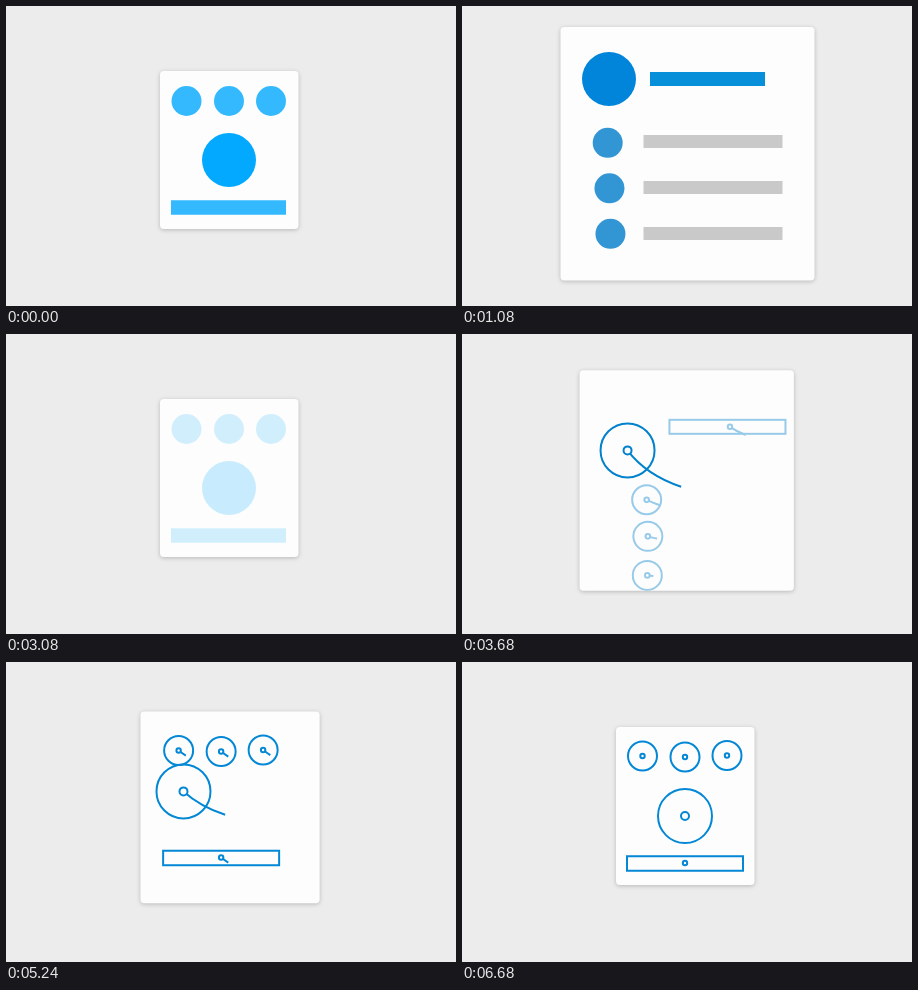
An HTML page that plays this animation: 450x300 px, repeating every 7080 ms.

```html
<!DOCTYPE html>
<html lang="en">
<head>
<meta charset="utf-8">
<title>Card transition</title>
<style>
  html, body { margin: 0; width: 100%; height: 100%; overflow: hidden; background: #ececec; }
  svg { display: block; width: 100vw; height: 100vh; }
  #card { fill: #fdfdfd; filter: drop-shadow(0 1px 2px rgba(0, 0, 0, .22)); }
</style>
</head>
<body>
<svg viewBox="0 0 450 300">
  <defs><clipPath id="inside"><rect id="clip" rx="4"/></clipPath></defs>
  <rect id="card" rx="4"/>
  <g id="content" clip-path="url(#inside)"></g>
</svg>
<script>
const LOOP = 7080;
const LINES_FROM = 3130;
const MOVE = 700;
const CARD_SMALL = [154, 65, 292.5, 223];
const CARD_LARGE = [98.5, 21, 352.5, 274.5];
const GRAY_BAR_TOPS = [129, 175, 221];

// Each path runs from the open pose (0) to the closed pose (1).
const FILLED = {
  open: 230, close: 1681, drift: [-28, -25],
  bright: [2, 169, 255], dark: [0, 133, 219],
  hero: [[147, 73], [173, 130], [223, 154]],
  row: [[180.5, 95], [223, 95], [265, 95]]
};
const LINED = {
  open: 3257, close: 4821, drift: [-21, -18],
  bright: [4, 136, 214], dark: [0, 121, 194],
  hero: [[147, 72], [158, 134], [223, 154]],
  row: [[180.5, 94], [223, 95], [265, 93.5]]
};
const LIST = [
  [[145, 136], [165, 160], [200, 172]],
  [[146, 181], [166, 199], [197, 205]],
  [[146, 226], [166, 241], [193, 242]]
];
const TITLE = [[248, 73], [262, 93], [285, 101.5]];

const $ = id => document.getElementById(id);
const ramp = (t, from, to) => Math.min(1, Math.max(0, (t - from) / (to - from)));
const ease = u => u * u * (3 - 2 * u);
const mix = (a, b, k) => a + (b - a) * k;
const mixAll = (a, b, k) => a.map((v, i) => mix(v, b[i], k));
const rgb = c => `rgb(${c.map(Math.round)})`;

// Quadratic blossom: a point when a equals b, a sub-curve's control otherwise.
const blossom = (path, a, b) =>
  mixAll(mixAll(path[0], path[1], a), mixAll(path[1], path[2], a), b);

const group = (opacity, body) => opacity > 0 ? `<g opacity="${opacity}">${body}</g>` : '';
const circle = ([x, y], r) => `<circle cx="${x}" cy="${y}" r="${r}"/>`;
const bar = ([x, y], w, h) => `<rect x="${x - w / 2}" y="${y - h / 2}" width="${w}" height="${h}"/>`;

function trail(path, s, dotRadius) {
  const end = 0.97;
  const at = blossom(path, s, s);
  const curve = s < end
    ? `<path d="M${at} Q${blossom(path, s, end)} ${blossom(path, end, end)}"/>` : '';
  return curve + `<g fill="#fdfdfd">${circle(at, dotRadius)}</g>`;
}

function driftPath([x, y], [dx, dy]) {
  return [[x + dx, y + dy], [x + dx * 0.55, y + dy * 0.4], [x, y]];
}

function draw(t) {
  const lined = t >= LINES_FROM;
  const look = lined ? LINED : FILLED;
  const closedness = (openDelay = 0, closeDelay = 0) => {
    const opened = ease(ramp(t - look.open - openDelay, 0, MOVE));
    const closed = ease(ramp(t - look.close - closeDelay, 0, MOVE));
    return 1 - opened + closed;
  };

  const s = closedness();
  const [left, top, right, bottom] = mixAll(CARD_LARGE, CARD_SMALL, s);
  for (const id of ['card', 'clip']) {
    const box = { x: left, y: top, width: right - left, height: bottom - top };
    for (const key in box) $(id).setAttribute(key, box[key]);
  }

  const shown = lined ? ramp(t, 3130, 3250) : 1 - ramp(t, 2900, 3130);
  let rowShown, listShown;
  if (lined) {
    rowShown = t < 4500 ? shown * (1 - ramp(t, 3270, 3420)) : ramp(t, 5080, 5220);
    listShown = ramp(t, 3600, 3800) * (1 - ramp(t, 4830, 5000));
  } else {
    rowShown = 0.8 * shown * (t < 1000 ? 1 - ramp(t, 40, 300) : ramp(t, 2100, 2500));
    listShown = ramp(t, 600, 850) * (1 - ramp(t, 1690, 1850));
  }

  const tint = rgb(mixAll(look.dark, look.bright, Math.min(1, s * 1.5)));
  const withTrail = (path, k, dot) => lined ? trail(path, k, dot) : '';

  const heroAt = closedness(35, 35);
  const hero = circle(blossom(look.hero, heroAt, heroAt), 27) + withTrail(look.hero, heroAt, 4);

  let row = '';
  for (const spot of look.row) {
    const path = driftPath(spot, look.drift);
    row += circle(blossom(path, s, s), lined ? 14.5 : 15) + withTrail(path, s, 2.2);
  }
  const footPath = driftPath([223, 201], look.drift);
  const [footX, footY] = blossom(footPath, s, s);
  row += bar([footX - (lined ? 0 : 0.5), footY + 0.5], lined ? 116 : 115, 14.5)
    + withTrail(footPath, s, 2.2);

  let list = '';
  LIST.forEach((path, i) => {
    const k = closedness(206 + 25 * i);
    list += circle(blossom(path, k, k), lined ? 14.5 : 15) + withTrail(path, k, 2.3);
  });

  const titleAt = closedness(120);
  const [titleX, titleY] = blossom(TITLE, titleAt, titleAt);
  const title = bar([titleX - 2.5, titleY], lined ? 116 : 115, 14) + withTrail(TITLE, titleAt, 2.2);

  let body;
  if (lined) {
    body = `<g fill="none" stroke="${tint}" stroke-width="2">`
      + group(listShown, list + title) + group(rowShown, row) + group(shown, hero) + '</g>';
  } else {
    const grayBars = GRAY_BAR_TOPS.map(y => bar([251, y + 6.5], 139, 13)).join('');
    body = group(listShown, `<g fill="#c9c9c9">${grayBars}</g>`
        + `<g fill="#3396d4">${list}</g><g fill="#078fd9">${title}</g>`)
      + `<g fill="${tint}">` + group(rowShown, row) + group(shown, hero) + '</g>';
  }
  $('content').innerHTML = body;
}

function tick() {
  draw(performance.now() % LOOP);
  requestAnimationFrame(tick);
}
tick();
</script>
</body>
</html>
```
